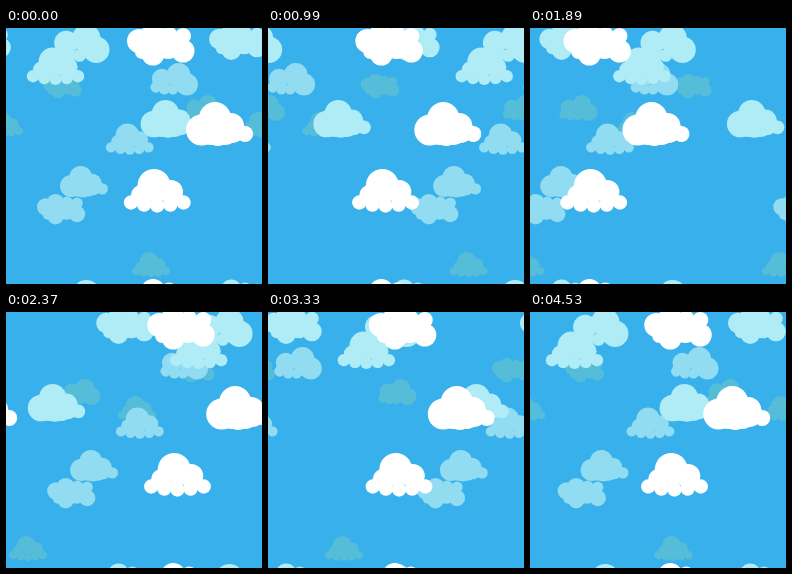
An HTML page that plays this animation: 256 by 256 pixels, repeating every 4560 ms.

```html
<!DOCTYPE html>
<html lang="en">
<head>
<meta charset="utf-8">
<title>Drifting clouds</title>
<style>
  html, body { margin: 0; width: 100%; height: 100%; overflow: hidden; background: #38b0ec; }
  svg { display: block; width: 100vw; height: 100vh; }
</style>
</head>
<body>
<svg id="sky" viewBox="0 0 256 256"></svg>
<script>
const SIZE = 256, STEP = 30, STEPS = 152;
const NS = 'http://www.w3.org/2000/svg';

// A sagging row of equal puffs along the underside of a cloud
function base(from, to, y, sag, r, count) {
  return Array.from({ length: count }, (_, i) => {
    const k = i / (count - 1);
    return [from + (to - from) * k, y + sag * Math.sin(Math.PI * k), r];
  });
}

// Puffs as [cx, cy, r], relative to the cloud's top left corner
const SHAPES = {
  peak: [[30, 16.5, 16.5], [47, 23, 12], [17, 26, 10], ...base(7, 59.5, 33.5, 3, 7.2, 5)],
  oval: [[29, 16, 16], [15.5, 28, 15.5], [45, 24, 13], [59, 32, 8], ...base(18, 46, 28, 3, 13, 5)],
  bumpy: [[12, 18, 12], [26, 12.5, 12.5], [42, 11.5, 8], [56, 13, 8],
          [56, 28, 11.5], [26, 31, 11.5], [41, 24, 12], [15, 29, 7]],
  lean: [[40, 16.5, 16.5], [51.5, 30, 15.5], [16.5, 22, 14], ...base(8, 44, 34, 3, 7.5, 4)]
};

// Back to front; nearer layers are larger and faster
const LAYERS = [
  { color: '#56bdd9', clouds: [['bumpy', 37, 46], ['lean', 179, 67], ['peak', 235, 84], ['peak', 126, 224]] },
  { color: '#91dcf0', clouds: [['lean', 144, 35], ['peak', 100, 95.5], ['oval', 54, 138], ['bumpy', 31, 166]] },
  { color: '#afecf6', clouds: [['lean', 46, -4], ['peak', 21, 19.5], ['bumpy', 203, -4.5], ['oval', 134.6, 72]] },
  { color: '#ffffff', clouds: [['bumpy', 121, -5], ['oval', 180, 74], ['peak', 118, 141]] }
];

function add(parent, tag, attrs) {
  const node = document.createElementNS(NS, tag);
  for (const key in attrs) node.setAttribute(key, attrs[key]);
  return parent.appendChild(node);
}

function drawCloud(parent, shape, x, y, scale) {
  const g = add(parent, 'g', { transform: `translate(${x} ${y}) scale(${scale})` });
  for (const [cx, cy, r] of SHAPES[shape]) add(g, 'circle', { cx, cy, r });
}

const sky = document.getElementById('sky');
add(sky, 'rect', { width: SIZE, height: SIZE, fill: '#38b0ec' });

// Each layer is a tile that repeats in both directions
const layers = LAYERS.map(({ color, clouds }, depth) => {
  const turns = depth + 1;
  const scale = 0.43 + 0.1425 * turns;
  const node = add(sky, 'g', { fill: color });
  for (const [shape, x, y] of clouds) {
    for (const dx of [-2 * SIZE, -SIZE, 0]) {
      for (const dy of [0, SIZE]) drawCloud(node, shape, x + dx, y + dy, scale);
    }
  }
  return { node, turns };
});

function render(time) {
  const step = Math.floor(time / STEP) % STEPS;
  for (const { node, turns } of layers) {
    const shift = (step * turns / STEPS % 1) * SIZE;
    node.setAttribute('transform', `translate(${shift.toFixed(2)} 0)`);
  }
}

const start = performance.now();
function tick() {
  render(performance.now() - start);
  requestAnimationFrame(tick);
}
render(0);
requestAnimationFrame(tick);
</script>
</body>
</html>
```
